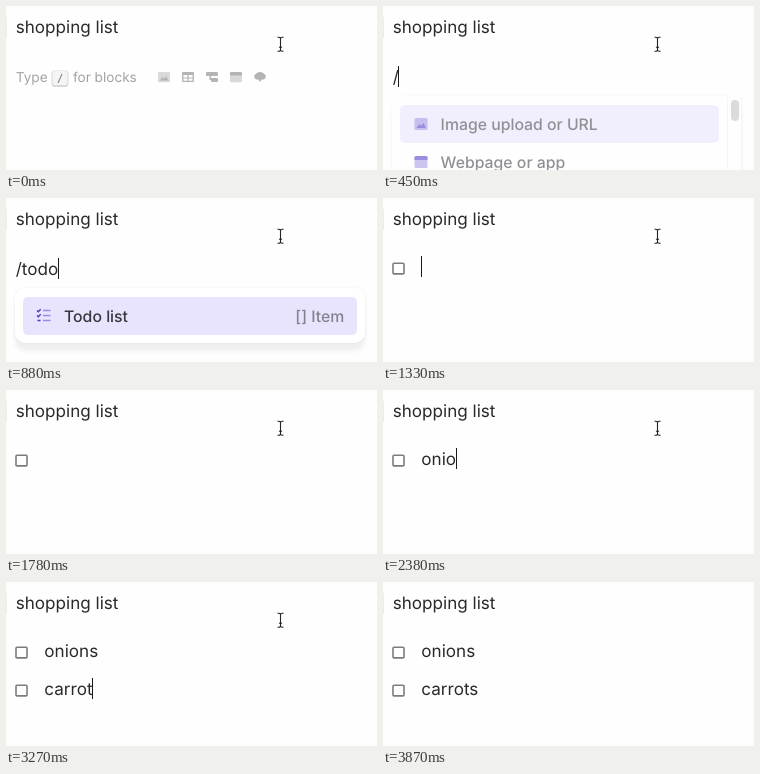
These frames come from a looping animation (371 by 164 pixels, 4.47 s). An HTML page:

```html
<!DOCTYPE html>
<html lang="en">
<head>
<meta charset="utf-8">
<title>Shopping list</title>
<style>
  html, body { margin: 0; width: 100%; height: 100%; overflow: hidden; background: #fefefe; }
  svg { display: block; width: 371px; height: 164px; font-family: Inter, sans-serif; }
  text { white-space: pre; fill: #2a2a2a; text-rendering: geometricPrecision; }
  .body { font-size: 17.1px; }
  .hint { font-size: 13.6px; fill: #a3a3a3; }
  .item { font-size: 15.8px; font-weight: 500; fill: #38363f; }
  .muted { fill: #85828f; }
  .panel { fill: #fff; filter: drop-shadow(0 8px 2px rgba(0,0,0,.06)) drop-shadow(0 0 1.5px rgba(0,0,0,.06)); }
  .box { fill: #fefefe; stroke: #7c7c7c; stroke-width: 1.6; }
  .line { fill: none; stroke: #4a32cc; stroke-width: 1.3; }
  .pale { opacity: .5; }
</style>
</head>
<body>
<svg viewBox="0 0 371 164">
  <defs>
    <g id="picture">
      <rect class="pale" width="13" height="12" rx="1.5"/>
      <path d="M2 10L5 6L6.8 8L8.8 5L11.5 10Z"/>
    </g>
    <g id="browser">
      <rect class="pale" width="13" height="12" rx="1.5"/>
      <path d="M0 4V1.5Q0 0 1.5 0H11.5Q13 0 13 1.5V4Z"/>
    </g>
  </defs>

  <rect y="11" width="1" height="21" fill="#ededed"/>
  <text class="body" x="9.7" y="27">shopping list</text>

  <g id="placeholder">
    <text class="hint" x="9.8" y="76">Type</text>
    <rect x="45.5" y="64.5" width="17" height="16.5" rx="3.5" fill="#d9d9d9"/>
    <rect x="46.5" y="65" width="15" height="14" rx="3" fill="#f5f5f5"/>
    <path d="M52 77L56 68" stroke="#888" stroke-width="1.1"/>
    <text class="hint" x="66.9" y="76">for blocks</text>
    <g fill="#b4b4b4">
      <use href="#picture" transform="translate(152 66) scale(.92 .85)"/>
      <path fill-rule="evenodd" d="M177 66H187Q188 66 188 67V75Q188 76 187 76H177Q176 76 176 75V67Q176 66 177 66ZM177.4 69V71.6H181.4V69ZM182.6 69V71.6H186.6V69ZM177.4 72.6V74.8H181.4V72.6ZM182.6 72.6V74.8H186.6V72.6Z"/>
      <path d="M201 66H211Q212 66 212 67V69Q212 70 211 70H205V72H211Q212 72 212 73V75Q212 76 211 76H206Q205 76 205 75V74H203.5V70H201Q200 70 200 69V67Q200 66 201 66Z"/>
      <use href="#browser" transform="translate(224 66) scale(.92 .85)"/>
      <path d="M250.5 73.5A3 3 0 0 1 250 67.8A4.5 3.4 0 0 1 258 67.8A3 3 0 0 1 257.5 73.5H256L254 76L252.5 73.5Z"/>
    </g>
  </g>

  <g id="menu">
    <rect id="panel" class="panel" x="9" y="90" width="350" height="55" rx="11"/>
    <rect id="active" x="17" y="99" width="319" height="38" rx="5" fill="#e8e4fd"/>
    <g id="scrollbar">
      <path d="M344.5 91V164M358.5 91V164" stroke="#f1f1f1"/>
      <rect id="thumb" x="348" y="94" width="8" height="21" rx="4" fill="#bfbfbf"/>
    </g>
    <g id="allItems">
      <g fill="#4a32cc">
        <use href="#picture" x="31.5" y="112"/>
        <use href="#browser" x="31.5" y="150"/>
      </g>
      <text class="item" x="57.6" y="124">Image upload or URL</text>
      <text class="item" x="57.6" y="162">Webpage or app</text>
    </g>
    <g id="todoItem">
      <path class="line" d="M31 112.5L32.3 113.8L34.7 111.2M31 117.5L32.3 118.8L34.7 116.2M31.5 122.5H34.5"/>
      <path class="line pale" d="M37 112.5H44.5M37 117.5H44.5M37 122.5H44.5"/>
      <text class="item" x="58" y="124">Todo list</text>
      <text id="shortcut" class="item muted" y="124" text-anchor="end">[] Item</text>
    </g>
    <g id="nextItem">
      <path class="line" d="M32 152L35 155L32 158"/>
      <path class="line pale" d="M38 151H45M38 155H45M38 159H45"/>
      <text class="item" x="57.6" y="162">Toggle list</text>
    </g>
  </g>

  <rect id="box1" class="box" x="10" y="65.3" width="11" height="10.6" rx="1"/>
  <rect id="box2" class="box" x="10" y="103.3" width="11" height="10.6" rx="1"/>
  <text id="command" class="body" x="9.7" y="77"></text>
  <text id="row1" class="body" x="38.3" y="75"></text>
  <text id="row2" class="body" x="38.3" y="113"></text>
  <rect id="caret" width="1" height="21" fill="#1a1a1a"/>

  <path id="pointer" fill="none" stroke="#222" stroke-width="1.1"
    d="M-3 -7H-1.6Q0 -7 0 -5.5Q0 -7 1.6 -7H3M0 -5.5V5.5M-3 7H-1.6Q0 7 0 5.5Q0 7 1.6 7H3M-1.6 3H1.6"/>
</svg>
<script>
const LOOP = 4470;
const $ = id => document.getElementById(id);
const show = (id, on) => { $(id).style.display = on ? '' : 'none'; };

// Each step changes only the listed parts of the state.
const steps = [
  [0, { command: '', row1: '', row2: '', rows: 0, menu: '', fade: 1, caret: '', pointer: [274.5, 38.3] }],
  [450, { command: '/', menu: 'all', fade: .55, caret: 'command' }],
  [590, { fade: 1 }],
  [740, { command: '/to', menu: 'some' }],
  [880, { command: '/todo', menu: 'one' }],
  [1330, { command: '', menu: '', rows: 1, caret: 'row1' }],
  [1780, { caret: '' }],
  [2080, { row1: 'o', caret: 'row1' }],
  [2230, { row1: 'oni' }],
  [2380, { row1: 'onio' }],
  [2530, { row1: 'onions' }],
  [2680, { rows: 2, caret: 'row2' }],
  [2830, { row2: 'c' }],
  [2980, { row2: 'car' }],
  [3130, { row2: 'carro' }],
  [3270, { row2: 'carrot' }],
  [3420, { row2: 'carrots' }],
  [3720, { pointer: [279.5, 61] }],
  [3870, { caret: '', pointer: null }],
];
const caretTop = { command: 60, row1: 58, row2: 96 };

const stateAt = time =>
  Object.assign({}, ...steps.filter(([start]) => start <= time).map(([, change]) => change));

function drawMenu(kind, fade) {
  const single = kind === 'one';
  show('menu', kind);
  show('allItems', kind === 'all');
  show('todoItem', kind === 'some' || single);
  show('nextItem', kind === 'some');
  show('scrollbar', !single);
  $('menu').style.opacity = fade;
  $('panel').setAttribute('height', single ? 55 : 100);
  $('active').setAttribute('width', single ? 334 : 319);
  $('thumb').setAttribute('height', kind === 'some' ? 38 : 21);
  $('shortcut').setAttribute('x', single ? 338.3 : 323.3);
}

function draw(time) {
  const s = stateAt(time);
  show('placeholder', !s.command && !s.rows);
  show('box1', s.rows > 0);
  show('box2', s.rows > 1);
  for (const id of ['command', 'row1', 'row2']) $(id).textContent = s[id];
  drawMenu(s.menu, s.fade);

  show('caret', s.caret);
  if (s.caret) {
    const line = $(s.caret);
    const width = s[s.caret] ? line.getComputedTextLength() : 0;
    $('caret').setAttribute('x', Math.round(+line.getAttribute('x') + width - .4));
    $('caret').setAttribute('y', caretTop[s.caret]);
  }

  show('pointer', s.pointer);
  if (s.pointer) $('pointer').setAttribute('transform', `translate(${s.pointer})`);
}

const began = performance.now();
function tick() {
  draw((performance.now() - began) % LOOP);
  requestAnimationFrame(tick);
}
tick();
</script>
</body>
</html>
```
